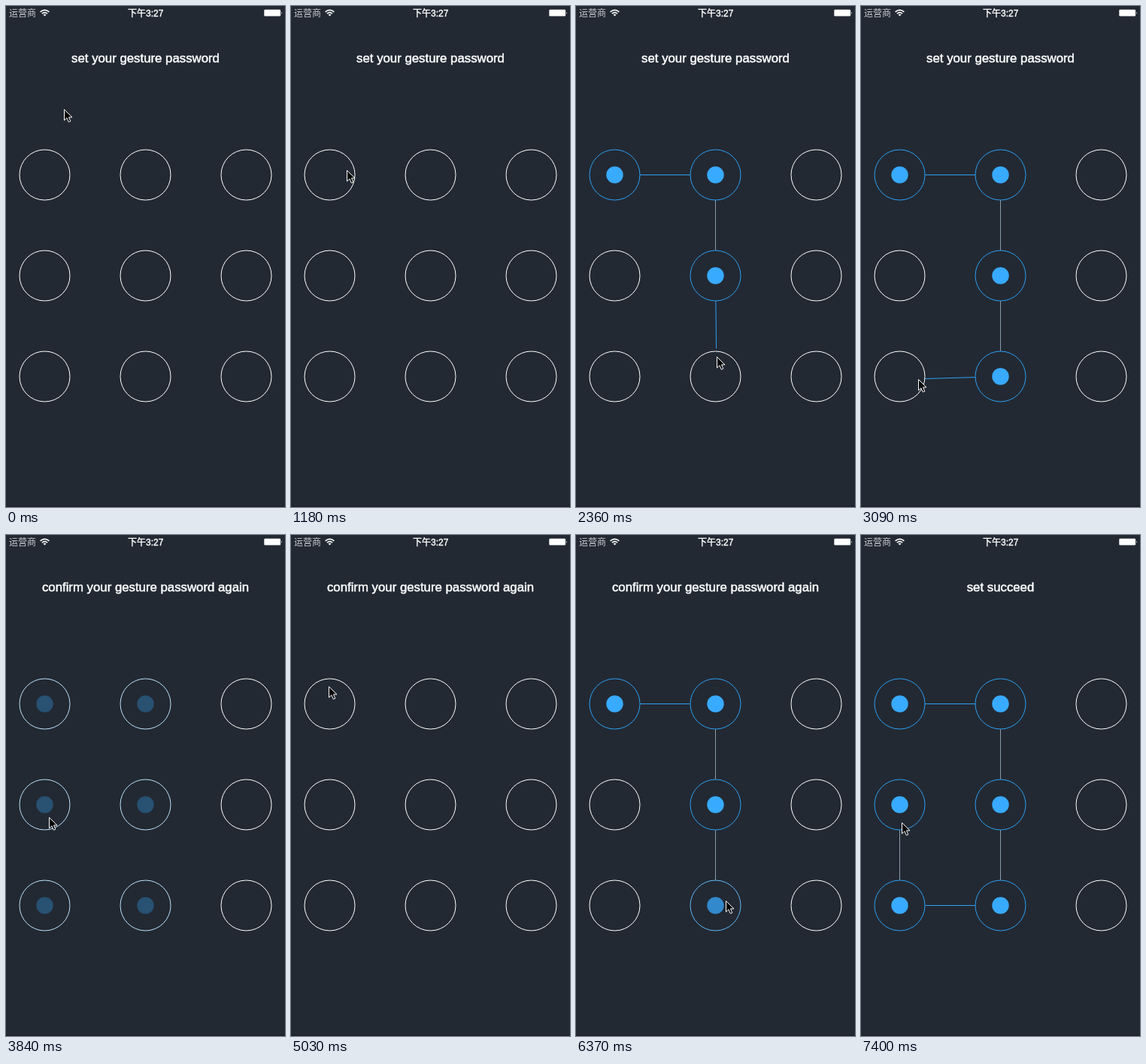
Write an HTML page that moves like this. It is 371 px wide and 666 px high and loops after 8 s.

```html
<!DOCTYPE html>
<html lang="en">
<head>
<meta charset="utf-8">
<title>Gesture password</title>
<style>
  html, body { margin: 0; width: 100%; height: 100%; overflow: hidden; background: #222933; }
  svg { display: block; width: 371px; height: 666px; }
  text { font-family: "Liberation Sans", "Noto Sans CJK SC", "Noto Sans CJK", sans-serif; fill: #fff; }
  #title { font-size: 16.8px; text-anchor: middle; stroke: #fff; stroke-width: .5px; }
  .status { font-size: 12px; }
  .ring { fill: #222933; }
  .dot { fill: #38aaff; }
</style>
</head>
<body>
<svg viewBox="0 0 371 666">
  <rect width="371" height="666" fill="#222933"/>
  <rect y="664" width="371" height="2" fill="#1f222d"/>
  <text class="status" x="4" y="13.5" style="fill:#c9cbd0">运营商</text>
  <g fill="none" stroke="#fff" stroke-width="1.6">
    <path d="M45.6 7.8Q51.5 2.8 57.4 7.8M47.9 10.2Q51.5 7.2 55.1 10.2"/>
    <path d="M51.5 13.6L49.5 11.4Q51.5 10 53.5 11.4Z" fill="#fff" stroke="none"/>
  </g>
  <text class="status" x="162" y="13.5" stroke="#fff" stroke-width=".4">下午3:27</text>
  <rect x="343.3" y="4.7" width="21.8" height="8.8" rx="1.3" fill="#fff"/>
  <path d="M366 7.4q1.5 1.7 0 3.6z" fill="#fff"/>
  <text id="title" x="185.5" y="75"></text>
  <g id="lines"></g>
  <g id="nodes"></g>
  <path id="cursor" d="M.5 .5V15L3.9 11.8L6.3 17.2L8.8 16.1L6.5 10.9H11Z"
        stroke="#fff" stroke-linejoin="round"/>
</svg>
<script>
const LOOP = 8000, STEP = 148, LEAD = 8;   // the picture advances once per STEP ms
const FADE = 26, CONFIRM = 27, DONE = 50;  // in steps
const RADIUS = 33.5, LAG = .2;             // the touch trails the pointer by LAG steps
const $ = id => document.getElementById(id);

// Turning points of the pointer: step, x, y
const path = [
  [0, 77, 137], [2, 69, 205], [3, 74, 218], [8.4, 74, 218],
  [12, 184, 228], [17, 187, 494], [21, 55, 496], [23.2, 57, 375],
  [29, 57, 375], [32, 48, 200], [33, 48, 200], [34, 50, 201], [35, 50, 201],
  [38.5, 184, 228], [40, 189, 322], [41, 189, 322],
  [43, 199, 486], [46, 56, 497], [48.1, 54, 382]
];

function pointer(step) {
  const next = path.findIndex(p => p[0] > step);
  if (next < 0) return { x: path.at(-1)[1], y: path.at(-1)[2] };
  const [s0, x0, y0] = path[next - 1], [s1, x1, y1] = path[next];
  const p = (step - s0) / (s1 - s0), ease = p * p * (3 - 2 * p);
  return { x: x0 + (x1 - x0) * ease, y: y0 + (y1 - y0) * ease };
}

function add(parent, tag, attrs) {
  const el = document.createElementNS("http://www.w3.org/2000/svg", tag);
  for (const name in attrs) el.setAttribute(name, attrs[name]);
  return parent.appendChild(el);
}

const nodes = Array.from({ length: 9 }, (_, i) => {
  const x = 51.5 + 134 * (i % 3), y = 224.5 + 134 * Math.floor(i / 3);
  return {
    x, y,
    ring: add($("nodes"), "circle", { class: "ring", cx: x, cy: y, r: RADIUS }),
    dot: add($("nodes"), "circle", { class: "dot", cx: x, cy: y, r: 11.2 })
  };
});
const lines = nodes.map(() => add($("lines"), "line", {}));

// Follows the touch and notes the step at which it enters each circle
function trace(press, release) {
  const hits = [];
  for (let s = press; s < release; s += .05) {
    const touch = pointer(s - LAG);
    const node = nodes.find(n => Math.hypot(n.x - touch.x, n.y - touch.y) < RADIUS);
    if (node && !hits.some(h => h.node === node)) hits.push({ node, step: Math.ceil(s) });
  }
  return hits;
}
const firstStroke = trace(9, FADE), secondStroke = trace(36, DONE);

function setLit({ ring, dot }, amount) {
  const mix = to => Math.round(255 + (to - 255) * amount);
  ring.setAttribute("stroke", `rgb(${mix(46)},${mix(160)},${mix(242)})`);
  dot.setAttribute("opacity", amount);
}

function setLine(line, from, to) {
  line.setAttribute("x1", from.x);
  line.setAttribute("y1", from.y);
  line.setAttribute("x2", to.x);
  line.setAttribute("y2", to.y);
  line.setAttribute("stroke", from.x === to.x ? "#8b9aa9" : "#309fee");
}

function render(step) {
  const { x, y } = pointer(step);
  $("cursor").setAttribute("transform", `translate(${Math.round(x)} ${Math.round(y)})`);
  $("title").textContent = step < FADE ? "set your gesture password"
    : step < DONE ? "confirm your gesture password again" : "set succeed";

  const fading = step === FADE;
  const hits = (step < CONFIRM ? firstStroke : secondStroke).filter(h => h.step <= step);
  nodes.forEach(node => {
    const hit = hits.find(h => h.node === node);
    setLit(node, !hit ? 0 : fading ? .31 : step > hit.step ? 1 : .75);
  });
  lines.forEach((line, i) => {
    const shown = i < hits.length && !fading;
    line.setAttribute("visibility", shown ? "visible" : "hidden");
    if (shown) setLine(line, hits[i].node, hits[i + 1]?.node ?? pointer(step - LAG));
  });
}

const start = performance.now();
function tick() {
  const t = (performance.now() - start) % LOOP;
  render(Math.floor((t + LEAD) / STEP));
  requestAnimationFrame(tick);
}
tick();
</script>
</body>
</html>
```
